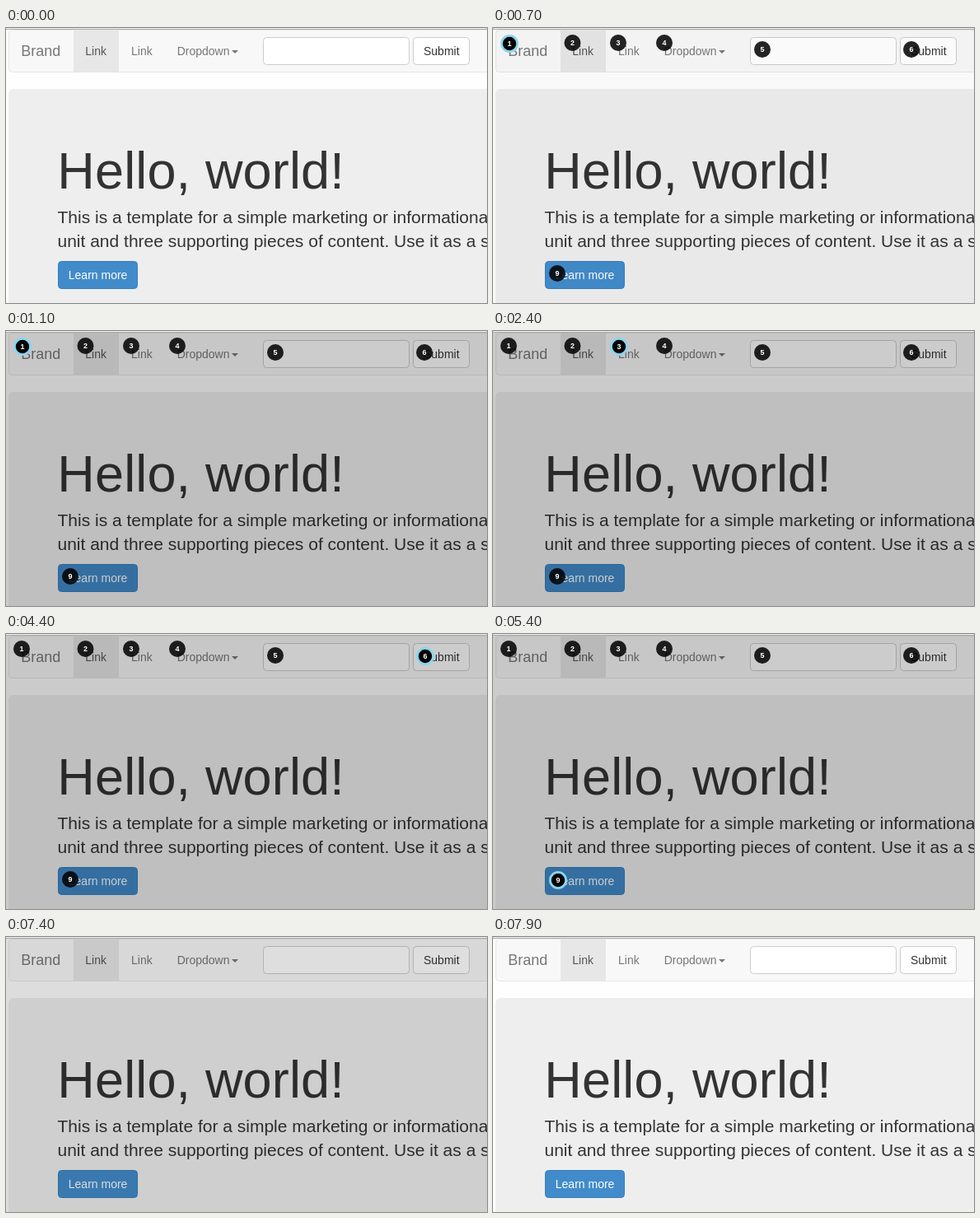
Animation of 584x334 px, one loop 8 s. Source, as an HTML page:

```html
<!DOCTYPE html>
<html lang="en">
<head>
<meta charset="utf-8">
<title>Keyboard focus order</title>
<style>
  html, body { margin: 0; width: 100%; height: 100%; overflow: hidden; background: #fff; }
  svg { display: block; width: 584px; height: 334px; font-family: "Liberation Sans", Arial, sans-serif; }
  text { font-size: 14px; fill: #333; white-space: pre; }
  .nav { fill: #777; }
  .brand { font-size: 18px; }
  .active { fill: #555; }
  .title { font-size: 63px; letter-spacing: .15px; }
  .lead { font-size: 21px; }
  .light { fill: #fff; }
  .digit { font-size: 9px; font-weight: bold; fill: #fff; text-anchor: middle; }
</style>
</head>
<body>
<svg viewBox="0 0 584 334">
  <rect width="584" height="334" fill="#fefefe"/>

  <!-- Navigation bar -->
  <rect x="3.5" y="2.5" width="620" height="51" rx="4" fill="#f8f8f8" stroke="#e7e7e7"/>
  <rect x="82" y="3" width="55" height="50" fill="#e7e7e7"/>
  <text class="nav brand" x="18.3" y="34">Brand</text>
  <text class="active" x="96.3" y="33">Link</text>
  <text class="nav" x="152" y="33">Link</text>
  <text class="nav" x="207.7" y="33">Dropdown</text>
  <path d="M274 27h8l-4 4z" fill="#777"/>
  <rect x="312.5" y="11.5" width="177" height="33" rx="4" fill="#fff" stroke="#ccc"/>
  <rect x="494.5" y="11.5" width="68" height="33" rx="4" fill="#fff" stroke="#ccc"/>
  <text x="507" y="33">Submit</text>

  <!-- Hero panel -->
  <rect x="3" y="74" width="620" height="300" rx="6" fill="#eee"/>
  <text class="title" x="62.3" y="195">Hello, world!</text>
  <text class="lead" x="62.5" y="237">This is a template for a simple marketing or informational website.</text>
  <text class="lead" x="62.5" y="266">unit and three supporting pieces of content. Use it as a starting point</text>
  <rect x="63.5" y="283.5" width="96" height="33" rx="4" fill="#428bca" stroke="#357ebd"/>
  <text class="light" x="75.8" y="305">Learn more</text>

  <rect id="shade" y="2" width="584" height="332" opacity="0"/>
  <rect width="584" height="1" fill="#f0f0f0"/>
  <rect y="1" width="584" height="1" fill="#aaa"/>
  <g id="badges"></g>
</svg>
<script>
const LOOP = 8000;
const SHOW = 600, HIDE = 7200, FADE = 500, DIM = 0.2;

// Number, centre, and the span in which the badge holds focus
const stops = [
  [1, 19, 18, 600, 1500],
  [2, 96.5, 18, 1500, 2100],
  [3, 152, 18, 2100, 2800],
  [4, 208, 18, 2800, 3400],
  [5, 327, 26, 3400, 4000],
  [6, 508, 26, 4000, 4650],
  [9, 78, 298, 5100, 5800]
];

const layer = document.getElementById("badges");
const shade = document.getElementById("shade");

function add(parent, tag, attrs) {
  const el = document.createElementNS("http://www.w3.org/2000/svg", tag);
  for (const key in attrs) el.setAttribute(key, attrs[key]);
  return parent.appendChild(el);
}

function makeBadge([num, x, y, from, to]) {
  const idle = add(layer, "g", { transform: `translate(${x} ${y})` });
  add(idle, "circle", { r: 10, fill: "#000", "fill-opacity": 0.86 });
  // The ring grows the badge right and down
  const lit = add(layer, "g", { transform: `translate(${x + 1} ${y + 1})` });
  add(lit, "circle", { r: 9.6, fill: "#000", stroke: "#8ad6ee", "stroke-width": 2.8 });
  for (const g of [idle, lit]) {
    add(g, "text", { class: "digit", y: 3.2 }).textContent = num;
  }
  return { idle, lit, from, to };
}

const badges = stops.map(makeBadge);

const swing = t => 0.5 - Math.cos(Math.PI * Math.min(1, Math.max(0, t))) / 2;
const toggle = (el, on) => el.setAttribute("visibility", on ? "visible" : "hidden");

function draw(t) {
  const level = swing((t - SHOW) / FADE) - swing((t - HIDE) / FADE);
  shade.setAttribute("opacity", DIM * level);
  const shown = t >= SHOW && t < HIDE;
  for (const { idle, lit, from, to } of badges) {
    const focused = t >= from && t < to;
    toggle(lit, shown && focused);
    toggle(idle, shown && !focused);
  }
}

const start = performance.now();
function tick(now) {
  draw(Math.max(0, now - start) % LOOP);
  requestAnimationFrame(tick);
}
draw(0);
requestAnimationFrame(tick);
</script>
</body>
</html>
```
